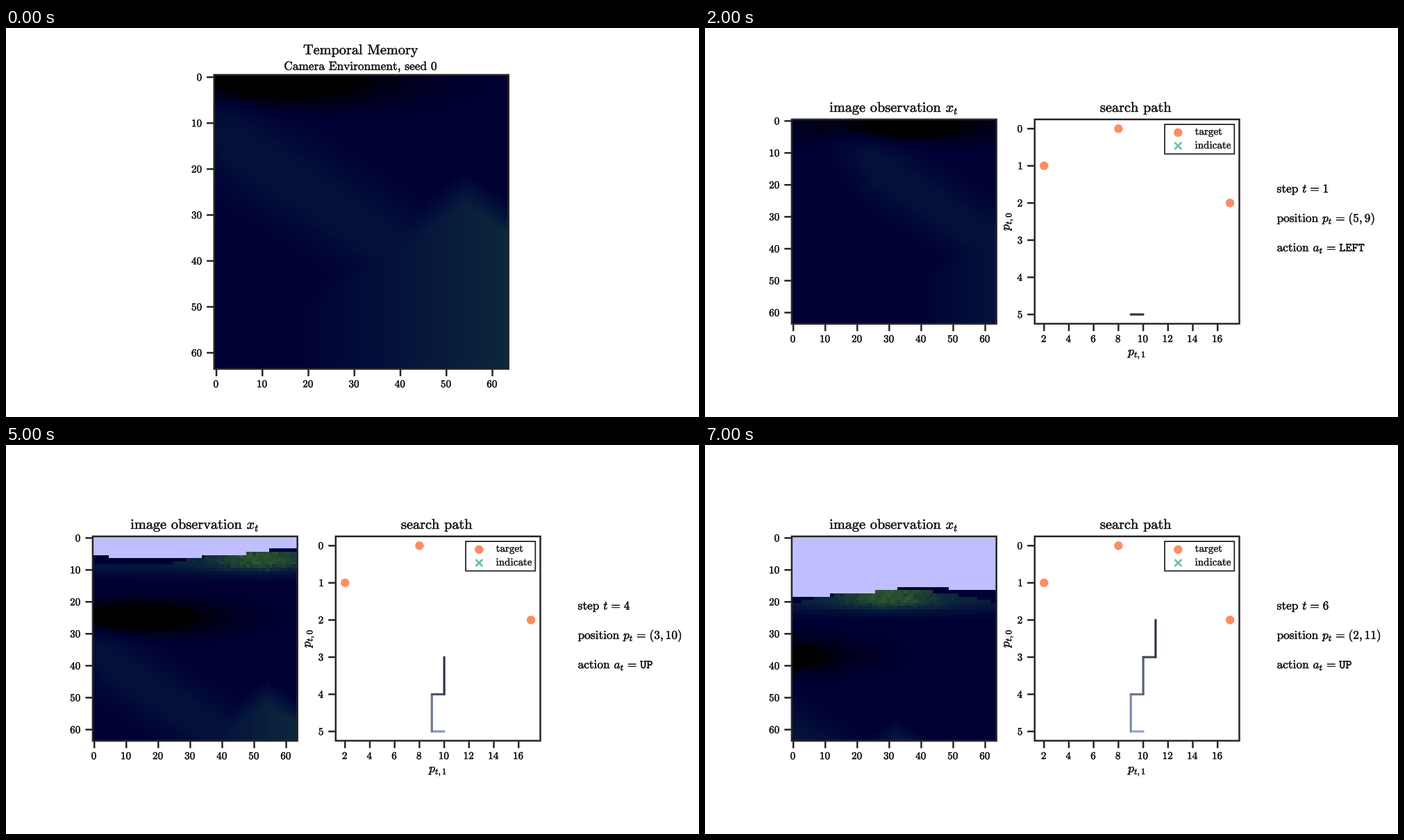
Write a matplotlib script that moves like this. It is 998 px wide and 561 px high and loops after 8000 ms.

```python
import matplotlib.pyplot as plt
import numpy as np
from matplotlib.animation import FuncAnimation
from matplotlib.colors import to_rgb
from matplotlib.patches import Circle, Rectangle
from matplotlib.patheffects import withStroke

W, H, DPI = 998, 561, 128
PT = 72 / DPI  # points per pixel
plt.rcParams["mathtext.fontset"] = "cm"

EDGE, INK = "#262626", "#161616"
TICK, BODY, TITLE = 8.5, 9.75, 11.4
ORANGE, GREEN = "#fc8d62", "#66c2a5"
TRAIL_OLD, TRAIL_NEW = (np.array(to_rgb(c)) for c in ("#a8b8e4", "#2f3644"))

PATH = [(5, 10), (5, 9), (4, 9), (4, 10), (3, 10), (3, 11), (2, 11)]
TARGETS = [(0, 8), (1, 2), (2, 17)]
MOVES = {(-1, 0): "UP", (1, 0): "DOWN", (0, -1): "LEFT", (0, 1): "RIGHT"}

# Ground colours from shade 0 (black) to 4 (grass).
SHADES = [(0, 0, 0), (0, 0, 51), (4, 19, 59), (14, 42, 60), (48, 90, 44)]
SKY = (191, 191, 255)


def bump(d, width):
    return np.exp(-(d / width) ** 2)


def ground(u, y):
    """Shade of the valley: dark trough, diagonal ridge, lit right slope."""
    trough = bump(u - 12, 25) * bump(y - 1, 5)
    ridge = bump(y - 12 - .65 * u, 11) * np.clip((u + 15) / 18, 0, 1)
    edge = np.interp(u, [0, 54, 64], [57, 20, 27])
    slope = np.clip((u - 15) / 49, 0, 1) * np.clip((y - edge) / 8, 0, 1)
    return 1 - 1.7 * trough + np.maximum(.95 * ridge, 1.9 * slope)


def hills(u, r):
    """Shade of the grassy mound, r rows below the top of the distance."""
    lit = .45 + .55 * bump(u - 52, 20)
    fade = np.interp(r, [6, 8.5, 10, 11, 14], [2.8, 2.75, 2, 1.2, 0])
    rough = np.random.default_rng(4).normal(0, .12, u.shape)
    top = np.minimum(4.5 + 4 * ((u - 54) / 32) ** 2, 8.5)
    shade = 1 + fade * lit
    return np.where(r < top, .85, shade + rough * (shade > 2.7))


def observe(pos):
    """64 x 64 camera image: a window on one panorama, moved by position."""
    row, col = np.mgrid[0:64, 0:64]
    u = col + 22 * (pos[1] - 10)
    y = row + 12 * (pos[0] - 5)
    r = y + 24
    far = hills(u, r)
    shade = np.where(r < 14, np.maximum(ground(u, y), far), ground(u, y))
    rgb = np.stack([np.interp(shade, range(5), c) for c in zip(*SHADES)], -1)
    crest = np.interp(u, [0, 8, 26, 52, 56, 68, 72], [6, 7, 7, 5.2, 4, 4, 5])
    rgb[r < crest.round()] = SKY
    return rgb.round().astype(np.uint8)


def rm(s):
    """Roman math text with proper word spaces."""
    s = s.replace(", ", r",\hspace{0.18}").replace(" ", r"\hspace{0.38}")
    return r"\mathrm{" + s + "}"


def write(x, y, s, size, ha="center", va="baseline", color=INK, **kw):
    ax.text(x, y, f"${s}$", fontsize=size, ha=ha, va=va, color=color,
            path_effects=[withStroke(linewidth=.25, foreground=color)], **kw)


def line(xs, ys, width, color=EDGE, **kw):
    ax.plot(xs, ys, color=color, lw=width * PT, snap=False, **kw)


def dot(x, y):
    ax.add_patch(Circle((x, y), 6.2, fc=ORANGE, ec="none", zorder=3))


def frame(x0, y0, x1, y1, width=2.5, fill="none"):
    ax.add_patch(Rectangle((x0, y0), x1 - x0, y1 - y0, fc=fill, ec=EDGE,
                           lw=width * PT, snap=False, zorder=2.5))


def ticks(x0, y1, xticks, yticks):
    """Ticks as (position, label) pairs along the bottom and left edges."""
    for x, n in xticks:
        line([x, x], [y1, y1 + 10.6], 2.5, solid_capstyle="butt")
        write(x, y1 + 26.5, n, TICK)
    for y, n in yticks:
        line([x0 - 10.6, x0], [y, y], 2.5, solid_capstyle="butt")
        write(x0 - 16.2, y + 5, n, TICK, ha="right")


def camera(x0, y0, size, pos):
    cell = size / 64
    top = y0 - .6
    ax.imshow(observe(pos), extent=(x0, x0 + size, top + size, top),
              aspect="auto", interpolation="nearest", zorder=0)
    frame(x0, y0, x0 + size, y0 + size)
    marks = [(cell * (n + .5), n) for n in range(0, 61, 10)]
    ticks(x0, y0 + size, [(x0 + d, n) for d, n in marks],
          [(y0 + d, n) for d, n in marks])


def search(t):
    rows = 5 if t else 2

    def px(p):
        return 488.3 + 17.85 * (p - 2)

    def py(p):
        return 145.2 + 267.9 * p / rows

    frame(474.8, 131.8, 769.5, 426.5)
    ticks(474.8, 426.5, [(px(n), n) for n in range(2, 17, 2)],
          [(py(n), n) for n in range(rows + 1)])
    write(621, 121, rm("search path"), TITLE)
    write(622.5, 472, "p_{t,1}", 10)
    write(437, 278.5, "p_{t,0}", 10, va="center", rotation=90)

    for k in range(t):
        (r0, c0), (r1, c1) = PATH[k:k + 2]
        age = (k + 1) / t
        line([px(c0), px(c1)], [py(r0), py(r1)], 3.2,
             TRAIL_OLD + age * (TRAIL_NEW - TRAIL_OLD),
             solid_capstyle="round")
    for r, c in TARGETS:
        dot(px(c), py(r))

    frame(662, 139, 762.3, 181.6, 1.8, "white")
    dot(681.3, 150.8)
    for s in (-5, 5):
        line([676.3, 686.3], [170 - s, 170 + s], 2.7, GREEN,
             zorder=3, solid_capstyle="butt")
    write(705.5, 154, rm("target"), TICK, ha="left", color=EDGE)
    write(705.5, 173.7, rm("indicate"), TICK, ha="left", color=EDGE)


def info(t):
    r, c = PATH[t]
    move = "NONE"
    if t:
        move = MOVES[r - PATH[t - 1][0], c - PATH[t - 1][1]]
    eq = r"\hspace{0.12}=\hspace{0.12}"
    gap = r"\hspace{0.38}"
    rows = [
        rm("step") + gap + "t" + eq + str(t),
        rm("position") + gap + "p_t" + eq + f"({r},{c})",
        rm("action") + gap + "a_t" + eq + r"\mathtt{" + move + "}",
    ]
    for i, s in enumerate(rows):
        write(823.5, 237.2 + 42.4 * i, s, BODY, ha="left")


def draw(i):
    ax.clear()
    ax.set_axis_off()
    if i == 0:
        write(511.5, 38, rm("Temporal Memory"), TITLE)
        write(511, 60.5, rm("Camera Environment, seed 0"), BODY)
        camera(299.7, 67.6, 424, PATH[0])
    else:
        t = i - 1
        write(272, 121, rm("image observation") + r"\hspace{0.38}x_t", TITLE)
        camera(124.9, 131.8, 294.8, PATH[t])
        search(t)
        info(t)
    ax.set_xlim(0, W)
    ax.set_ylim(H, 0)
    return []


fig = plt.figure(figsize=(W / DPI, H / DPI), dpi=DPI, facecolor="white")
ax = fig.add_axes([0, 0, 1, 1])
anim = FuncAnimation(fig, draw, frames=8, interval=1000, repeat=True,
                     repeat_delay=0)
plt.show()
```
